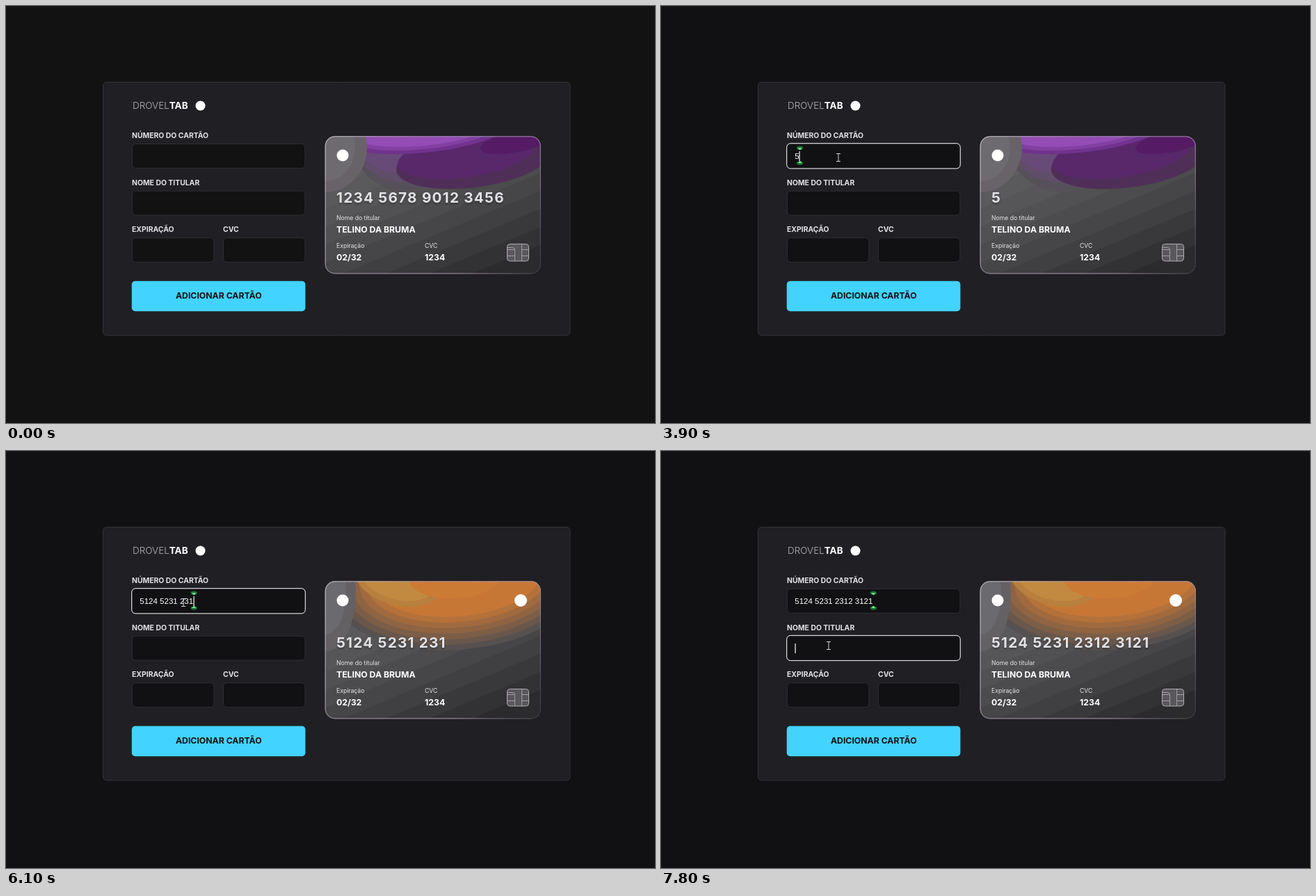
Animation of 933x600 px, one loop 8 s. Source, as an HTML page with a canvas:

```html
<!DOCTYPE html>
<html lang="pt-BR">
<head>
<meta charset="utf-8">
<title>Cartão</title>
<style>
  html, body { margin: 0; width: 100%; height: 100%; overflow: hidden; background: #111113; }
  canvas { display: block; width: 933px; height: 600px; }
</style>
</head>
<body>
<canvas id="stage" width="933" height="600"></canvas>
<script>
const ctx = document.getElementById('stage').getContext('2d');
const LOOP = 8000, TICK = 100;
const FOCUS = 1000, BRAND = 4100, NAME_FOCUS = 7700;
const INTER = 'Inter, sans-serif';
const ARIAL = '"Liberation Sans", Arial, sans-serif';
const CARD = { x: 458.7, y: 187.3, w: 310, h: 198, r: 14 };

const DIGITS = '5124523123123121';
// When each digit is pressed
const KEYS = [2935, 4100, 4300, 4550, 4600, 5400, 5500, 5700,
              5850, 5900, 6100, 6300, 6400, 6500, 6600, 7000];

const lerp = (a, b, k) => a + (b - a) * k;

function ease(t, from, to) {
  const k = Math.min(1, Math.max(0, (t - from) / (to - from)));
  return k * k * (3 - 2 * k);
}

function mix(a, b, k) {
  return `rgb(${a.map((v, i) => Math.round(lerp(v, b[i], k)))})`;
}

function typedAt(t) {
  const count = KEYS.filter(k => t >= k).length;
  return DIGITS.slice(0, count).replace(/(.{4})(?=.)/g, '$1 ');
}

function caretVisible(t) {
  const last = Math.max(...[FOCUS, NAME_FOCUS, ...KEYS].filter(k => k <= t));
  return (t - last) % 960 < 500;
}

function pointerAt(t) {
  const enter = ease(t, 100, 900), leave = ease(t, 7200, 7800);
  const settle = t >= 1200 ? 1 : 0;
  return [
    Math.round(lerp(25, 255, enter) - 14 * leave),
    Math.round(lerp(25, 217, enter) + settle + 62 * leave)
  ];
}

function text(s, x, y, font, color, align = 'left') {
  ctx.font = font;
  ctx.fillStyle = color;
  ctx.textAlign = align;
  ctx.fillText(s, x, y);
}

function box(x, y, w, h, r, fill, stroke) {
  ctx.beginPath();
  ctx.roundRect(x, y, w, h, r);
  if (fill) { ctx.fillStyle = fill; ctx.fill(); }
  if (stroke) { ctx.strokeStyle = stroke; ctx.lineWidth = 1; ctx.stroke(); }
}

function oval(x, y, rx, ry, fill, turn = 0) {
  ctx.beginPath();
  ctx.ellipse(x, y, rx, ry, turn, 0, Math.PI * 2);
  ctx.fillStyle = fill;
  ctx.fill();
}

// Nested ovals shrinking by (dx, dy) while the colour moves from a to b
function rings(n, x, y, rx, ry, dx, dy, turn, a, b) {
  for (let i = 0; i < n; i++)
    oval(x, y, rx - i * dx, ry - i * dy, mix(a, b, i / (n - 1)), turn);
}

// Diagonal steps from light to dark, each covering all below its edge
function greyBands() {
  const n = 10;
  for (let i = 0; i < n; i++) {
    const y = i ? 240 + i * 26 : 0;
    const v = 92 - 57 * (i / n) ** 1.3;
    ctx.beginPath();
    ctx.moveTo(458, y);
    ctx.lineTo(770, y - 131);
    ctx.lineTo(770, 600);
    ctx.lineTo(458, 600);
    ctx.fillStyle = `rgb(${v + 1},${v},${v + 2})`;
    ctx.fill();
  }
}

function purpleArt() {
  rings(3, 580, 188, 84, 80, 4, 14, -0.15, [86, 80, 89], [104, 74, 120]);
  oval(672, 222, 112, 39, '#4f2f58', -0.13);
  oval(662, 214, 100, 32, '#59286a', -0.15);
  oval(735, 195, 54, 15, '#551b65', -0.2);
  rings(3, 600, 179, 125, 32, 14, 5, -0.1, [113, 50, 142], [147, 77, 180]);
  rings(2, 459, 204, 60, 64, 17, 16, 0, [103, 99, 105], [110, 107, 112]);
}

function orangeArt() {
  rings(7, 650, 184, 186, 102, 11, 8, -0.09, [86, 81, 80], [199, 119, 53]);
  rings(2, 564, 184, 64, 38, 10, 8, 0.25, [184, 128, 62], [194, 138, 64]);
  oval(645, 182, 66, 30, '#cc7b35', -0.05);
  rings(2, 459, 204, 44, 84, 14, 24, 0, [100, 97, 101], [107, 106, 110]);
}

function chip() {
  box(720.5, 342.5, 31, 24.5, 4, '#59575b', '#b0aeb2');
  ctx.beginPath();
  for (const y of [350.5, 359.5]) {
    ctx.moveTo(721, y); ctx.lineTo(731, y);
    ctx.moveTo(741, y); ctx.lineTo(751, y);
  }
  ctx.moveTo(721, 347.5); ctx.lineTo(728, 347.5);
  ctx.quadraticCurveTo(731.5, 347.5, 731.5, 351);
  ctx.lineTo(731.5, 367);
  ctx.moveTo(741.5, 343); ctx.lineTo(741.5, 367);
  ctx.strokeStyle = '#a09ea2';
  ctx.stroke();
}

function detail(label, value, x, y) {
  text(label, x, y, `400 8.64px ${INTER}`, '#e6e6ea');
  text(value, x, y + 17.5, `700 12.24px ${INTER}`, '#fff');
}

function card(t, number) {
  const branded = t >= BRAND;
  const { x, y, w, h, r } = CARD;
  ctx.save();
  ctx.beginPath();
  ctx.roundRect(x, y, w, h, r);
  ctx.clip();
  greyBands();
  if (branded) orangeArt(); else purpleArt();
  ctx.restore();

  const edge = ctx.createLinearGradient(x, y, x + w, y + h);
  edge.addColorStop(0, '#c4c2c6');
  edge.addColorStop(0.35, '#94869c');
  edge.addColorStop(0.7, '#a08fa8');
  edge.addColorStop(1, '#3a373e');
  box(x + 0.5, y + 0.5, w - 1, h - 1, r - 0.5, null, edge);

  oval(484, 215, 8.5, 8.5, '#fff');
  if (branded) oval(740, 215, 9, 9, '#fff');

  ctx.save();
  ctx.shadowColor = 'rgba(0,0,0,.3)';
  ctx.shadowBlur = 3;
  ctx.shadowOffsetY = 2;
  ctx.letterSpacing = '1.23px';
  text(number || '1234 5678 9012 3456', 475, 283, `700 20.7px ${INTER}`, '#e1e1e6');
  ctx.restore();

  detail('Nome do titular', 'TELINO DA BRUMA', 475, 308);
  detail('Expiração', '02/32', 475, 348);
  detail('CVC', '1234', 602, 348);
  chip();
}

function field(label, x, y, w, focused, bg) {
  text(label, x, y - 8, `700 10.4px ${INTER}`, '#e1e1e6');
  box(x + 0.5, y + 0.5, w - 0.7, 34.8, 5, bg, '#2d2d32');
  if (focused) box(x - 0.3, y - 0.3, w + 0.6, 36.2, 5.5, null, '#f2f2f4');
}

function caret(x, y) {
  ctx.fillStyle = '#fff';
  ctx.fillRect(Math.round(x) - 0.5, y, 1.2, 14);
}

// Green caps above and below the end of the typed text
function marker(x) {
  for (const dir of [1, -1]) {
    const y = 215.1 - dir * 10.9;
    oval(x, y, 4.6, 2.8, '#1d7138');
    ctx.beginPath();
    ctx.moveTo(x - 3, y);
    ctx.lineTo(x + 3, y);
    ctx.lineTo(x, y + dir * 3.2);
    ctx.fillStyle = '#7be89a';
    ctx.fill();
  }
}

function beam(x, y) {
  ctx.beginPath();
  for (const end of [y - 5.5, y + 5.5]) {
    ctx.moveTo(x - 3, end); ctx.lineTo(x + 3, end);
  }
  ctx.moveTo(x, y - 5.5); ctx.lineTo(x, y + 5.5);
  ctx.strokeStyle = '#d4d4d6';
  ctx.lineWidth = 1;
  ctx.stroke();
}

function arrow(x, y) {
  const shape = new Path2D('M0 0V15L3.5 12L6 17.5L8.5 16.5L6 11H10.5Z');
  ctx.save();
  ctx.translate(x, y);
  ctx.fillStyle = '#fff';
  ctx.fill(shape);
  ctx.strokeStyle = '#000';
  ctx.lineWidth = 0.8;
  ctx.stroke(shape);
  ctx.restore();
}

function pointer(t) {
  if (t < 100) return;
  const [x, y] = pointerAt(t);
  const overField = x > 181 && [198, 266].some(top => y > top && y < top + 36);
  (overField ? beam : arrow)(x, y);
}

function form(t, number, bg) {
  const nameOn = t >= NAME_FOCUS, numberOn = t >= FOCUS && !nameOn;

  text('DROVEL', 182, 148, `300 13.5px ${INTER}`, '#b5b5ba');
  text('TAB', 182 + ctx.measureText('DROVEL').width, 148, `700 13.5px ${INTER}`, '#fff');
  oval(279.5, 143.5, 7, 7, '#fff');

  field('NÚMERO DO CARTÃO', 181, 198, 249, numberOn, bg);
  field('NOME DO TITULAR', 181, 265.7, 249, nameOn, bg);
  field('EXPIRAÇÃO', 181, 333.2, 118, false, bg);
  field('CVC', 312, 333.2, 118, false, bg);

  box(180.8, 395.8, 249.6, 43.4, 5, '#42d3ff');
  text('ADICIONAR CARTÃO', 305.8, 421, `700 12.24px ${INTER}`, '#121214', 'center');

  text(number, 192.3, 220, `400 11.52px ${ARIAL}`, '#fff');
  const end = 192.8 + ctx.measureText(number).width;
  if (number) marker(end + 0.5);
  if (numberOn && caretVisible(t)) caret(end, 209);
  if (nameOn && caretVisible(t)) caret(193, 277);
}

function draw(now) {
  const t = Math.floor((now % LOOP) / TICK) * TICK;
  const number = typedAt(t);
  const bg = t < FOCUS ? '#121212' : '#111113';
  ctx.fillStyle = bg;
  ctx.fillRect(0, 0, 933, 600);
  box(139.5, 109.5, 671.5, 364.5, 5, '#202024', '#323238');
  form(t, number, bg);
  card(t, number);
  pointer(t);
}

const start = performance.now();
function tick() {
  draw(performance.now() - start);
  requestAnimationFrame(tick);
}
tick();
</script>
</body>
</html>
```
